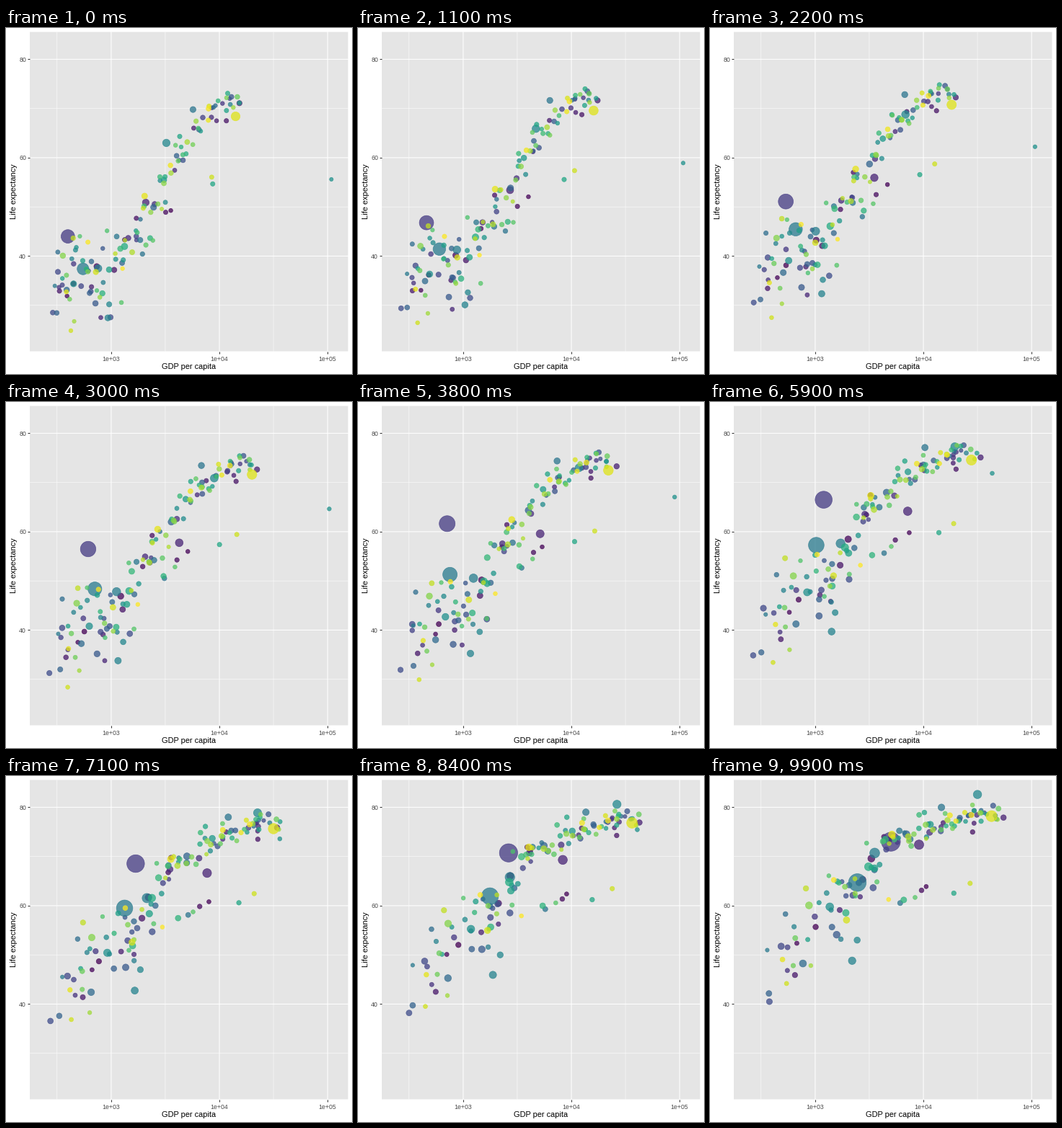
Animation, 480 px wide and 480 px high, one loop 10000 ms. Source, as a matplotlib script:

```python
import matplotlib.pyplot as plt
import numpy as np
from matplotlib.animation import FuncAnimation

STAGE, DPI = 480, 72
FRAMES, STEP = 100, 9          # nine frames per five-year interval
KNOTS, TOTAL = 12, 142

plt.rcParams["font.family"] = "Liberation Sans"

# Countries that stand out: colour rank, population in millions (first, last),
# then evenly spaced key points of log10 income and of life expectancy.
KEY = [
    (24, (556, 1319), (2.6, 2.71, 2.86, 3.08, 3.33, 3.7),
     (44, 49, 63.5, 66.5, 70, 73)),
    (58, (372, 1110), (2.74, 2.92, 3.39), (37.4, 55.5, 64.7)),
    (134, (158, 301), (4.15, 4.4, 4.63), (68.4, 73.7, 78.2)),
    (59, (82, 224), (2.88, 3.16, 3.55), (37.5, 54.5, 70.7)),
    (14, (57, 190), (3.32, 3.83, 3.96), (50.9, 62.2, 72.4)),
    (66, (86, 127), (3.51, 4.24, 4.5), (63, 76, 82.6)),
    (71, (0.2, 2.5), (5.035, 5.03, 4.53, 4.675), (55.6, 70.5, 77.6)),
]


def along(points):
    return np.interp(np.linspace(0, 1, KNOTS), np.linspace(0, 1, len(points)), points)


def crowd(n, rng):
    """Countries on the common trend: life rises with income in an S-curve."""
    t = np.linspace(0, 1, KNOTS)[:, None]
    rank = (rng.permutation(n) + 0.5) / n

    def drift(scale):
        return rng.normal(0, scale, (KNOTS, n)).cumsum(axis=0)

    x = 2.5 + 0.1 * t + (1.68 + 0.38 * t) * rank ** (1.2 - 0.35 * t) + drift(0.025)

    mid, steep = 3.45 - 0.15 * t, 5 - 1.7 * t
    s = 1 / (1 + np.exp(-steep * (x - mid)))
    low, high = 34 + 12 * t, 72.5 + 6.5 * t
    noise = rng.normal(0, 4.5, n) + drift(0.6)
    lag = 15 * (rng.random(n) < 0.07)
    y = low + (high - low) * s + noise * (1 - 0.75 * s) - lag * s

    first = np.clip(rng.lognormal(1.4, 1.2, n), 0.1, 50)
    pop = first * (1 + t * (2.2 - 1.9 * rank))
    return x, y, pop


def build():
    x, y, pop = np.empty((3, KNOTS, TOTAL))
    rest = np.ones(TOTAL, bool)
    for i, people, income, life in KEY:
        x[:, i], y[:, i], pop[:, i] = along(income), along(life), along(people)
        rest[i] = False
    x[:, rest], y[:, rest], pop[:, rest] = crowd(rest.sum(), np.random.default_rng(12))
    size = 2 + 10 * np.sqrt(pop / 1319)
    return x, y, 2.134 * size + 0.71


X, Y, DIAMETER = build()

fig = plt.figure(figsize=(STAGE / DPI, STAGE / DPI), dpi=DPI, facecolor="white")
ax = fig.add_axes([33 / STAGE, 31.5 / STAGE, 441.5 / STAGE, 443 / STAGE],
                  facecolor="#e5e5e5")
ax.set(xlim=(2.248, 5.189), ylim=(20.65, 85.55))
ax.set_axisbelow(True)
ax.spines[:].set_visible(False)

ax.set_xticks([3, 4, 5], ["1e+03", "1e+04", "1e+05"])
ax.set_yticks([40, 60, 80])
ax.set_xticks([2.5, 3.5, 4.5], minor=True)
ax.set_yticks([30, 50, 70], minor=True)
ax.tick_params(length=2.75, width=1.07, pad=2.2, color="#333333",
               labelsize=8.8, labelcolor="#4d4d4d")
ax.tick_params(axis="x", pad=3.6)
ax.tick_params(which="minor", length=0)
ax.grid(which="major", color="white", lw=1.07, snap=False)
ax.grid(which="minor", color="white", lw=0.53, snap=False)
ax.patch.set_snap(False)
fig.text(253.75 / STAGE, 7.3 / STAGE, "GDP per capita", size=11,
         ha="center", va="baseline")
fig.text(16 / STAGE, 253 / STAGE, "Life expectancy", size=11, rotation=90,
         ha="right", va="center")

colors = plt.get_cmap("viridis")(np.linspace(0, 1, TOTAL))
colors[:, 3] = 0.75
dots = ax.scatter(X[0], Y[0], s=DIAMETER[0] ** 2, c=colors,
                  edgecolors=colors, linewidths=0.7, zorder=3)


def draw(frame):
    k = min(frame // STEP, KNOTS - 2)
    f = frame / STEP - k
    x, y, d = (a[k] + f * (a[k + 1] - a[k]) for a in (X, Y, DIAMETER))
    dots.set_offsets(np.column_stack([x, y]))
    dots.set_sizes(d ** 2)
    return (dots,)


anim = FuncAnimation(fig, draw, frames=FRAMES, interval=100, repeat=True,
                     repeat_delay=0, blit=False)
plt.show()
```
